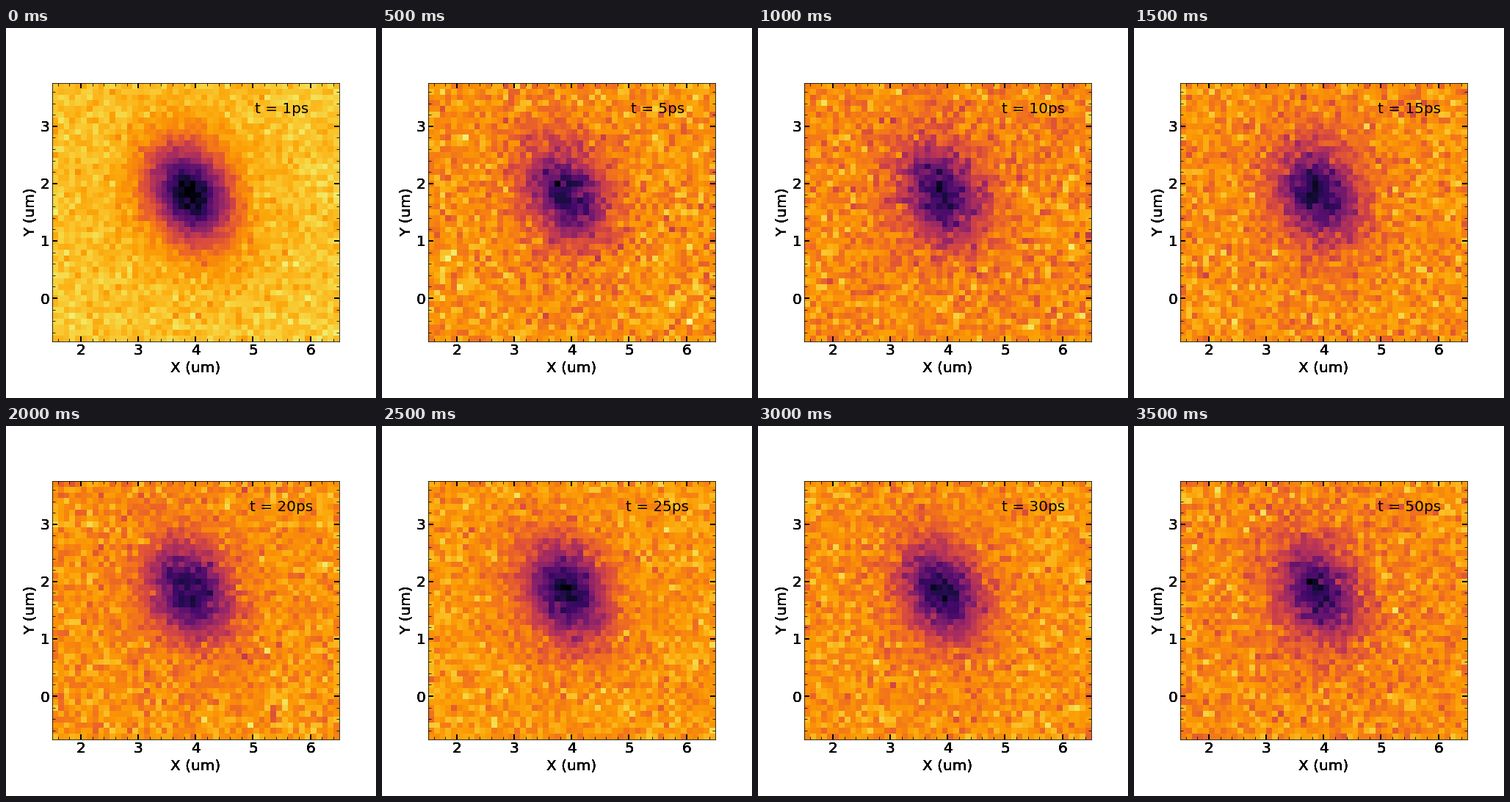
Animation of 504 by 504 pixels, one loop 4000 ms. Source, as a matplotlib script:

```python
import numpy as np
import matplotlib.pyplot as plt
from matplotlib.animation import FuncAnimation
from matplotlib.ticker import AutoMinorLocator, MultipleLocator

SIZE, DPI = 504, 72
X0, X1, Y0, Y1 = 1.5, 6.5, -0.75, 3.75
NX, NY = 50, 45
BOX = [0.125, 77.3 / SIZE, 0.775, 0.6975]
FONT = 20

# delay in ps, background level, core level, noise width
SCANS = [
    (1, 0.872, 0.015, 0.034),
    (5, 0.772, 0.135, 0.062),
    (10, 0.752, 0.145, 0.063),
    (15, 0.762, 0.115, 0.060),
    (20, 0.770, 0.115, 0.055),
    (25, 0.782, 0.100, 0.050),
    (30, 0.770, 0.115, 0.055),
    (50, 0.755, 0.135, 0.060),
]

plt.rcParams["font.family"] = "DejaVu Sans"


def spot(x, y, sx, sy, rho):
    """Tilted Gaussian of height 1 around the pump position."""
    u, v = (x - 3.9) / sx, (y - 1.83) / sy
    return np.exp(-(u * u - 2 * rho * u * v + v * v) / (2 * (1 - rho * rho)))


xs = X0 + (np.arange(NX) + 0.5) * (X1 - X0) / NX
ys = Y0 + (np.arange(NY) + 0.5) * (Y1 - Y0) / NY
gx, gy = np.meshgrid(xs, ys)
DIP = 0.9 * spot(gx, gy, 0.47, 0.56, -0.25) + 0.1 * spot(gx, gy, 1.1, 1.3, -0.1)


def scan(i):
    _, level, core, width = SCANS[i]
    rng = np.random.default_rng(40 + i)
    noise = width * rng.normal(size=DIP.shape)
    return np.clip(level - (level - core) * DIP + noise, 0, 1)


def add_axes(**ticks):
    ax = fig.add_axes(BOX)
    ax.set(xlim=(X0, X1), ylim=(Y0, Y1))
    for axis in (ax.xaxis, ax.yaxis):
        axis.set_major_locator(MultipleLocator(1))
    ax.tick_params(labelsize=FONT, direction="in", top=True, right=True, **ticks)
    ax.set_xlabel("X (um)", fontsize=FONT)
    ax.set_ylabel("Y (um)", fontsize=FONT)
    return ax


fig = plt.figure(figsize=(SIZE / DPI, SIZE / DPI), dpi=DPI)
ax = add_axes(length=7, width=2)
for axis in (ax.xaxis, ax.yaxis):
    axis.set_minor_locator(AutoMinorLocator(5))
ax.tick_params(which="minor", direction="in", length=4, width=0.8,
               top=True, right=True)

image = ax.imshow(scan(0), cmap="inferno", vmin=0, vmax=1, origin="lower",
                  extent=(X0, X1, Y0, Y1), aspect="auto",
                  interpolation="nearest")
label = ax.text(5.5, 3.3, "", fontsize=FONT, ha="center", va="center")

# Stacked labels make the lettering heavier.
for _ in range(5):
    layer = add_axes(length=0)
    layer.patch.set_visible(False)
    layer.spines[:].set_visible(False)


def update(i):
    image.set_data(scan(i))
    label.set_text(f"t = {SCANS[i][0]}ps")
    return image, label


anim = FuncAnimation(fig, update, frames=len(SCANS), interval=500,
                     repeat=True, repeat_delay=0, blit=False)
plt.show()
```
